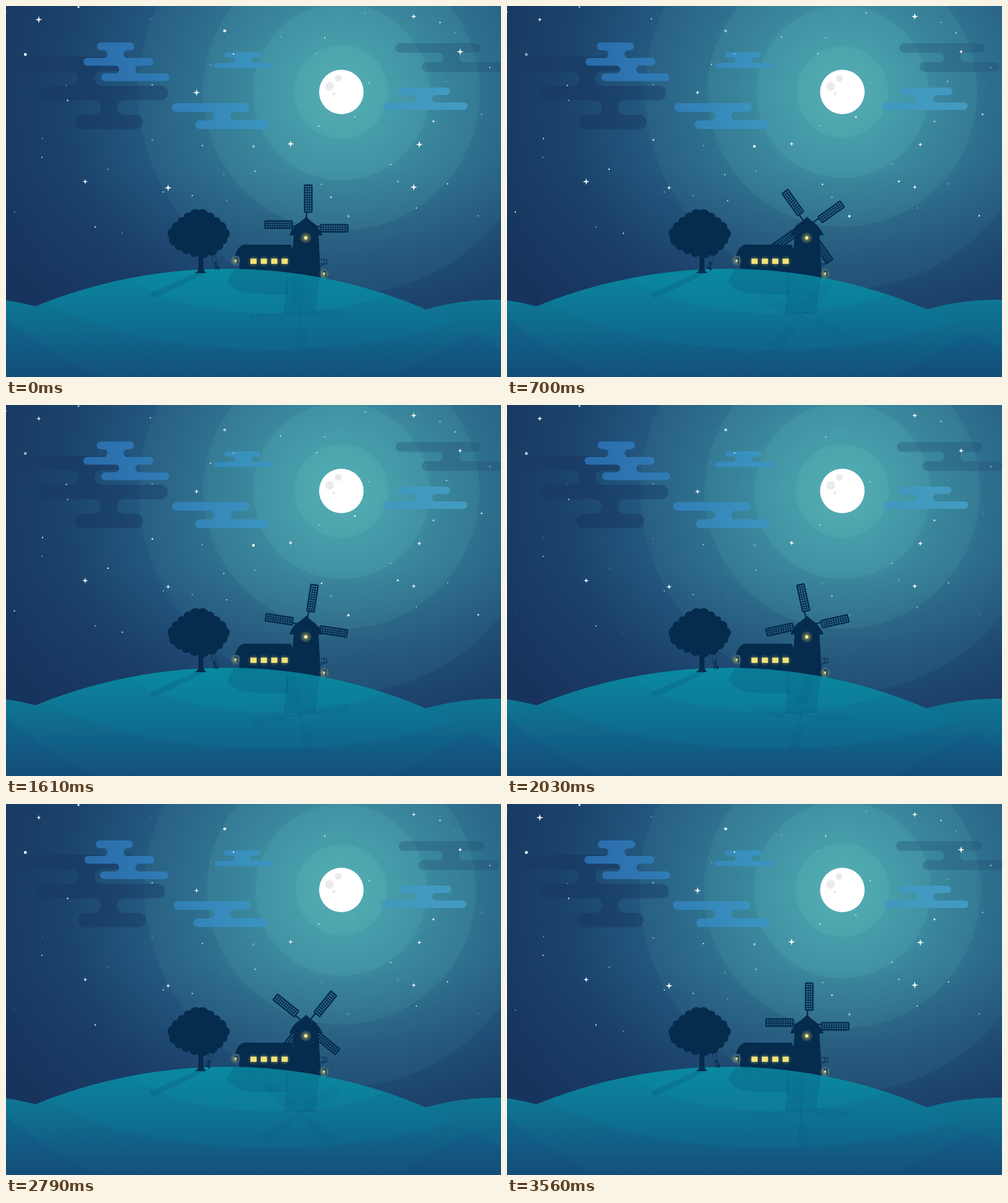
Animation, 800 px wide and 600 px high, one loop 3630 ms. Source, as an HTML page with a canvas:

```html
<!DOCTYPE html>
<html>
<head>
<meta charset="utf-8">
<style>
html, body { margin: 0; height: 100%; overflow: hidden; background: #17365e }
canvas { display: block }
</style>
</head>
<body>
<canvas id="stage" width="800" height="600"></canvas>
<script>
const ctx = document.getElementById('stage').getContext('2d');
const TAU = Math.PI * 2, LOOP = 3630, STEP = 70, LAST = 51;
const INK = '#052b4d', SHADE = 'rgba(8,75,115,.22)';
const MOON = { x: 542, y: 139 }, HILL = { x: 357, y: 1245, r: 820 };

function circle(x, y, r, fill) {
  ctx.fillStyle = fill;
  ctx.beginPath();
  ctx.arc(x, y, r, 0, TAU);
  ctx.fill();
}

function ellipse(x, y, rx, ry, fill) {
  ctx.fillStyle = fill;
  ctx.beginPath();
  ctx.ellipse(x, y, rx, ry, 0, 0, TAU);
  ctx.fill();
}

function shape(d, fill) {
  ctx.fillStyle = fill;
  ctx.fill(new Path2D(d));
}

function line(d, width) {
  ctx.strokeStyle = INK;
  ctx.lineWidth = width;
  ctx.stroke(new Path2D(d));
}

function ramp(gradient, ...stops) {
  stops.forEach(([at, colour]) => gradient.addColorStop(at, colour));
  return gradient;
}
const across = (...stops) => ramp(ctx.createLinearGradient(0, 0, 800, 0), ...stops);
const down = (top, bottom, ...stops) => ramp(ctx.createLinearGradient(0, top, 0, bottom), ...stops);
const around = (x, y, r, ...stops) => ramp(ctx.createRadialGradient(x, y, 0, x, y, r), ...stops);

const skyFill = around(MOON.x, MOON.y, 600, [0, '#479bac'], [.13, '#3c8da2'], [.24, '#337d98'],
  [.4, '#2a688a'], [.55, '#23577f'], [.75, '#1b436c'], [1, '#17365e']);
const duskFill = down(260, 480, [0, 'rgba(23,48,92,0)'], [1, 'rgba(23,48,92,.45)']);
const groundFill = down(425, 600, [0, '#0a859b'], [.4, '#0f7190'], [.72, '#115f86'], [1, '#145079']);
const lightCloud = across([.16, '#2a6cab'], [.3, '#2f79b4'], [.5, '#3a93bf'], [.85, '#429ac0']);
const darkCloud = across([0, 'rgba(22,54,96,.15)'], [.15, 'rgba(22,54,96,.6)'],
  [.33, 'rgba(22,54,96,.4)'], [1, 'rgba(22,54,96,.2)']);

function random(seed) {
  return () => (seed = seed * 16807 % 2147483647) / 2147483647;
}

// one dot in each cell of a loose grid; neighbours twinkle in turn
const rand = random(77);
const dots = Array.from({ length: 45 }, (_, i) => ({
  x: (i % 9 + rand()) * 89, y: (Math.floor(i / 9) + rand()) * 76,
  r: 1 + 1.4 * rand() ** 5, peak: i % 2 ? .06 : .7
}));
const slowSparkles = [[659, 17], [128, 284]];
const fastSparkles = [[53, 22], [734, 74], [262, 294], [659, 293], [460, 223], [308, 140], [668, 224]];

function sky(drift) {
  for (const fill of [skyFill, duskFill]) {
    ctx.fillStyle = fill;
    ctx.fillRect(0, 0, 800, 600);
  }
  [328, 224, 143, 76].forEach((r, i) =>
    circle(MOON.x, MOON.y, r * (1 - .03 * drift), `rgba(105,200,190,${.06 + .035 * i})`));
}

function moon() {
  circle(MOON.x, MOON.y, 36, '#fff');
  [[523, 130, 7], [537, 117, 5.5], [530, 142, 2.5]].forEach(crater => circle(...crater, '#ebebed'));
}

// stacked round bars sliding against each other, joined by necks where they overlap
function cloud(fill, top, h, shift, ...bars) {
  ctx.fillStyle = fill;
  ctx.beginPath();
  bars.forEach(([left, right], i) => {
    const y = top + 2 * h * i;
    ctx.roundRect(left + (i % 2 ? -shift : shift), y, right - left, h, h / 2);
    if (!i) return;
    const [aboveLeft, aboveRight] = bars[i - 1];
    const x = (Math.max(left, aboveLeft) + Math.min(right, aboveRight)) / 2;
    const r = h / 2, side = 13 + r, mid = y - r;
    ctx.moveTo(x + side, mid - r);
    ctx.arc(x + side, mid, r, -TAU / 4, TAU / 4, true);
    ctx.arc(x - side, mid, r, TAU / 4, -TAU / 4, true);
    ctx.closePath();
  });
  ctx.fill();
}

function sparkle(x, y, wave) {
  const r = 4.6 + 1.1 * wave;
  ctx.fillStyle = '#fff';
  ctx.beginPath();
  for (let i = 0; i < 8; i++) {
    const d = i % 2 ? r * .3 : r, a = i * TAU / 8;
    ctx.lineTo(x + d * Math.cos(a), y + d * Math.sin(a));
  }
  ctx.fill();
}

function stars(wave) {
  for (const { x, y, r, peak } of dots) {
    ctx.globalAlpha = Math.max(.2, Math.min(1, .62 + .55 * wave(4, peak)));
    circle(x, y, r, '#f4fbfc');
  }
  ctx.globalAlpha = 1;
  slowSparkles.forEach(([x, y]) => sparkle(x, y, wave(1, .28)));
  fastSparkles.forEach(([x, y]) => sparkle(x, y, wave(3, 0)));
}

const sail = new Path2D();
sail.roundRect(-4, -68, 14, 46, 2);
for (let row = 0; row < 11; row++)
  for (let col = 0; col < 3; col++) sail.rect(-1.7 + col * 3.6, -65.6 + row * 3.9, 2.2, 2.4);

function sails(angle, fill) {
  ctx.save();
  ctx.rotate(angle);
  ctx.fillStyle = fill;
  for (let i = 0; i < 4; i++) {
    ctx.fill(sail, 'evenodd');
    ctx.fillRect(-1, -23, 2.2, 23);
    ctx.rotate(TAU / 4);
  }
  ctx.restore();
}

function ground(angle) {
  shape('M0 476Q26 479 70 492V600H0Z M640 503Q715 475 790 475L800 475V600H640Z', groundFill);
  circle(HILL.x, HILL.y, HILL.r, groundFill);

  ctx.save();
  ctx.beginPath();
  ctx.arc(HILL.x, HILL.y, HILL.r, 0, TAU);
  ctx.clip();
  ellipse(430, 400, 420, 156, 'rgba(10,140,165,.16)');
  ellipse(430, 410, 240, 87, 'rgba(10,150,170,.2)');
  shape('M0 505Q65 560 145 600H0Z M757 529Q700 556 630 600H800V557Z', 'rgba(20,65,115,.15)');

  shape('M309 431H322Q290 450 240 472Q228 468 236 463Z', SHADE);
  shape('M372 420L357 445Q365 460 392 465L456 467V420Z', SHADE);
  shape('M455 430H509L503 466L500 498H449Z', SHADE);
  ctx.translate(475, 501);
  ctx.scale(1.18, -.9);
  sails(angle, 'rgba(8,75,115,.13)');
  ctx.restore();
}

function tree(swing) {
  shape('M305 395L311 404V424Q311 429 305 432H324Q319 428 319 423V407L331 395Z', INK);
  ellipse(312, 368, 40, 31, INK);
  for (let i = 0; i < 18; i++) {
    const a = i / 18 * TAU, egg = 1 + .2 * Math.sin(a);
    circle(312 + 41 * Math.cos(a) * Math.min(1, egg), 368 + 30 * Math.sin(a), 8.7 + 1.5 * Math.sin(i * 5), INK);
  }

  ctx.save();
  ctx.translate(333, 398);
  ctx.rotate(-.28 * swing);
  line('M-3 0V27M3 0V27', .6);
  line('M-4 27H4M0 19V26L3 30', 1.8);
  circle(0, 18, 1.7, INK);
  ctx.restore();
}

function buildings() {
  shape('M383 386H460L468 404V440H377V405L370 404Q373 391 383 386Z', INK);
  shape('M485 341Q492 348 500 353Q507 361 512 371H505L509 442H459L465 371H458Q462 359 470 353Q478 348 485 341Z', INK);
  line('M508 417H519M509 410H519M514 410V417M518.5 410V417M508 421L515 417', 1);
}

function glow(x, y, r, alpha) {
  circle(x, y, r, around(x, y, r, [0, `rgba(245,225,100,${alpha})`], [1, 'rgba(245,225,100,0)']));
}

function lights() {
  for (let i = 0; i < 4; i++) {
    const x = 400 + 16.8 * i;
    glow(x, 412.8, 10, .4);
    ctx.fillStyle = '#f2e27a';
    ctx.fillRect(x - 5, 408.5, 10, 8.6);
  }
  glow(484.5, 375, 10, .6);
  circle(484.5, 375, 2.7, '#f7ec9a');
  for (const [x, y] of [[371, 412], [514, 433]]) {
    glow(x, y, 9, .5);
    circle(x, y, 1.5, '#f7ec9a');
    line(`M${x - 2} ${y - 4}h5v9`, 1.3);
  }
}

function draw(time) {
  const turn = Math.min(LAST, Math.floor((time % LOOP + 10) / STEP)) / LAST;
  const wave = (cycles, peak) => Math.cos(TAU * (cycles * turn - peak));
  const sway = wave(2, 0), drift = (1 - sway) / 2, angle = -Math.PI * turn;

  sky(drift);
  cloud(darkCloud, 82, 23.5, 5 * drift, [14, 205], [55, 262], [112, 221]);
  cloud(darkCloud, 60, 15.5, 6 * drift, [629, 767], [672, 802]);
  moon();
  cloud(lightCloud, 59, 12.5, -2 * drift, [147, 207], [125, 238], [154, 264]);
  cloud(lightCloud, 75, 8.5, -drift, [353, 412], [336, 431]);
  cloud(lightCloud, 157, 14, 3 * drift, [268, 393], [306, 425]);
  cloud(lightCloud, 132, 12, 2 * drift, [633, 718], [609, 746]);
  stars(wave);
  ctx.save();
  ctx.translate(485.5, 356.4);
  sails(angle, INK);
  ctx.restore();
  buildings();
  ground(angle);
  tree(sway);
  lights();
}

let start;
function tick(now) {
  start ??= now;
  draw(now - start);
  requestAnimationFrame(tick);
}
requestAnimationFrame(tick);
</script>
</body>
</html>
```
